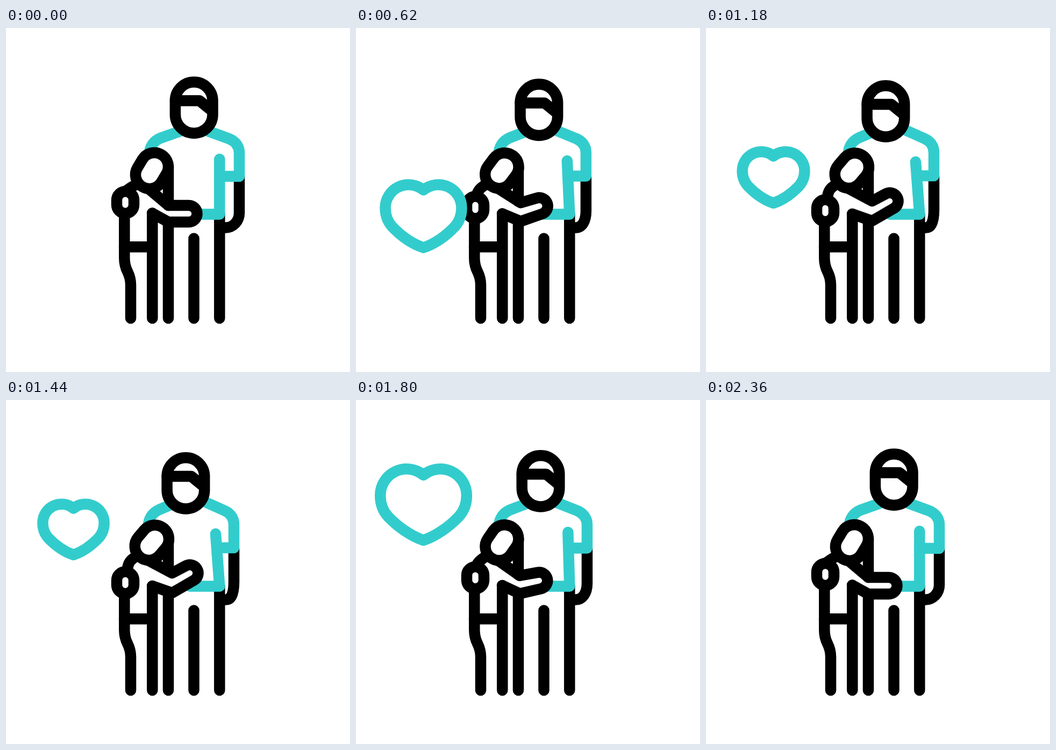
These frames come from a looping animation (640x640 px, 2400 ms). An HTML page with a canvas:

```html
<!DOCTYPE html>
<html lang="en">
<head>
<meta charset="utf-8">
<title>Hug</title>
<style>
  html, body { margin: 0; width: 100%; height: 100%; overflow: hidden; background: #fff; }
  canvas { display: block; width: 640px; height: 640px; }
</style>
</head>
<body>
<canvas id="stage" width="640" height="640"></canvas>
<script>
const ctx = document.getElementById('stage').getContext('2d');
const LOOP = 2400, STEP = 20;
const BLACK = '#000', TEAL = '#33cccc', WHITE = '#fff';

const mix = (a, b, p) => a + (b - a) * p;
const smooth = (from, to, t) => {
  const u = Math.min(1, Math.max(0, (t - from) / (to - from)));
  return u * u * (3 - 2 * u);
};

// [time, value] keys
const heartSize = [[270, 0], [570, 80], [690, 56], [820, 80], [948, 62], [1070, 80], [1195, 57],
  [1320, 84], [1445, 57], [1575, 84], [1700, 57], [1830, 84], [1955, 60], [2060, 70], [2210, 0]];
const heartY = [[200, 369], [420, 363.5], [620, 349], [940, 311], [1440, 240], [1800, 193.5], [2210, 175]];

function segment(keys, t) {
  let i = 0;
  while (i < keys.length - 2 && t > keys[i + 1][0]) i++;
  return i;
}

function eased(keys, t) {
  const i = segment(keys, t), [t0, a] = keys[i], [t1, b] = keys[i + 1];
  return mix(a, b, smooth(t0, t1, t));
}

// Cubic curve through the keys, flat at both ends
function curved(keys, t) {
  const slope = i => i === 0 || i === keys.length - 1 ? 0 :
    (keys[i + 1][1] - keys[i - 1][1]) / (keys[i + 1][0] - keys[i - 1][0]);
  const i = segment(keys, t), [t0, a] = keys[i], [t1, b] = keys[i + 1];
  const d = t1 - t0, u = Math.min(1, Math.max(0, (t - t0) / d)), v = 1 - u;
  return a * v * v * (1 + 2 * u) + b * u * u * (3 - 2 * u)
    + d * (slope(i) * u * v * v - slope(i + 1) * u * u * v);
}

function line(d, color = BLACK, fill) {
  const path = new Path2D(d);
  if (fill) {
    ctx.fillStyle = fill;
    ctx.fill(path);
  }
  ctx.strokeStyle = color;
  ctx.stroke(path);
}

function capsule(x1, y1, x2, y2, r) {
  const a = Math.atan2(y2 - y1, x2 - x1), path = new Path2D();
  path.arc(x2, y2, r, a - Math.PI / 2, a + Math.PI / 2);
  path.arc(x1, y1, r, a + Math.PI / 2, a + Math.PI * 1.5);
  path.closePath();
  ctx.fillStyle = WHITE;
  ctx.fill(path);
  ctx.strokeStyle = BLACK;
  ctx.stroke(path);
}

function drawAdult(p) {
  const m = (a, b) => mix(a, b, p);
  const side = m(434, 424);
  line(`M${side} 276V${m(344, 338)}C${side} ${m(359, 360)} ${m(423, 419)} 371.5 ${m(408, 409)} 371.5H402`);
  line('M302 361V540M349.5 391.5V540M397.3 346V540');

  line(`M${m(335, 330)} ${m(188, 185)}L${m(287, 285)} ${m(205, 204)}
    C${m(275, 272)} 210 ${m(267, 265)} 221 ${m(267, 265)} 234`, TEAL);
  line(`M360 ${m(186, 185)}L${m(415, 407)} 206C${m(427, 418)} 211 ${side} 220 ${side} 232
    V${m(276, 275)}H${m(397, 393)}`, TEAL);
  line(`M${m(397.3, 390)} ${m(244, 249)}L397.3 346.5H342`, TEAL);

  ctx.save();
  ctx.translate(m(0, -15.3), m(0, 6.7));
  capsule(349.7, 135.3, 349.7, 161, 34.8);
  line('M315 135.3H360L383 154');
  ctx.restore();
}

function drawChild(p) {
  const m = (a, b) => mix(a, b, p);
  const handX = m(340, 342), handY = m(345.5, 322), angle = m(0, -Math.PI / 6), r = 15.5;
  const nx = -Math.sin(angle) * r, ny = Math.cos(angle) * r;

  line(`M${m(264, 262)} ${m(298, 297)}L${m(302, 309)} ${m(330, 322)}L${handX - nx} ${handY - ny}
    A${r} ${r} 0 0 1 ${handX + nx} ${handY + ny}L${m(302, 309)} ${m(361, 359)}L272 ${m(344.5, 346)}`, BLACK, WHITE);
  line(`M302 258V${m(330, 318)}`);
  line(`M272.3 ${m(344.5, 346)}V540M220 407.3H272`);
  line('M220.3 350V428C220.3 437 222 445 226 453C230 461 232 469 232 478V540');

  const tail = m(0, 15.3);
  line(`M${m(222, 226)} ${m(304, 318)}C226 ${m(301, 303)} ${m(233, 232)} ${m(296, 297)} 242 291`);
  capsule(222, 320 + tail, 222, 329 + tail, 16);
  capsule(m(276, 277), m(258, 258.7), m(267, 265.7), m(273, 272), 26);
}

function drawHeart(t) {
  const s = eased(heartSize, t);
  if (s < 0.5) return;
  const y = curved(heartY, t);
  const at = (x, v) => `${125.5 + x * s} ${y + v * s} `;
  line(`M${at(0, -.67)}A${.61 * s} ${.61 * s} 0 0 1 ${at(1, -.2)}
    C${at(1, 0)}${at(.93, .17)}${at(.82, .29)}C${at(.6, .52)}${at(.3, .74)}${at(0, .84)}
    C${at(-.3, .74)}${at(-.6, .52)}${at(-.82, .29)}C${at(-.93, .17)}${at(-1, 0)}${at(-1, -.2)}
    A${.61 * s} ${.61 * s} 0 0 1 ${at(0, -.67)}Z`, TEAL);
}

function draw(now) {
  const t = Math.floor((now % LOOP) / STEP) * STEP;
  const lean = smooth(262, 885, t) - smooth(1450, 2070, t);
  ctx.fillStyle = WHITE;
  ctx.fillRect(0, 0, 640, 640);
  ctx.lineWidth = 20.5;
  ctx.lineCap = ctx.lineJoin = 'round';
  drawAdult(lean);
  drawChild(lean);
  drawHeart(t);
}

const start = performance.now();
function tick() {
  draw(performance.now() - start);
  requestAnimationFrame(tick);
}
tick();
</script>
</body>
</html>
```
